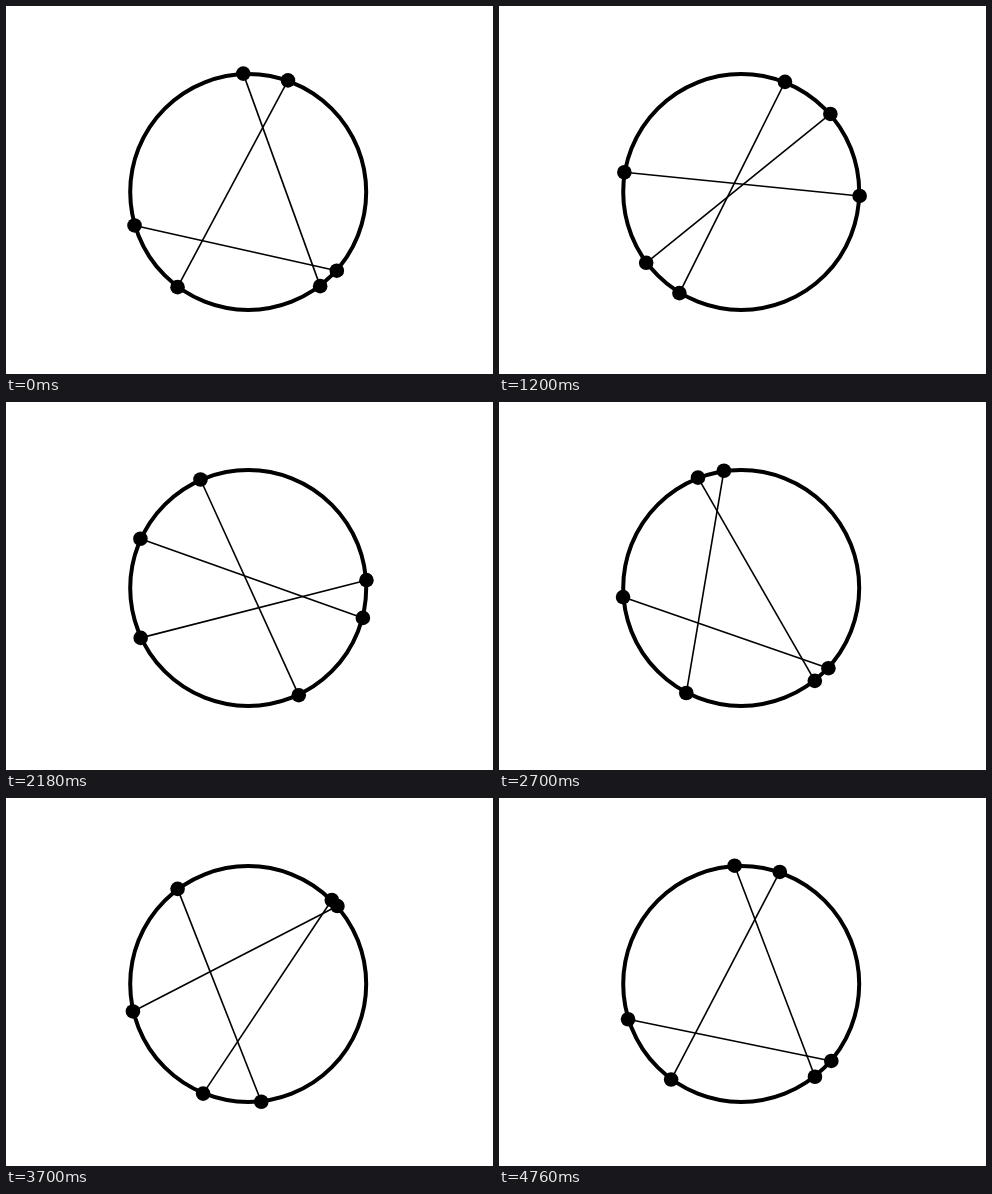
Write an HTML page with a canvas that moves like this. It is 487 px wide and 368 px high and loops after 4.78 s.

```html
<!DOCTYPE html>
<html>
<head>
<meta charset="utf-8">
<style>
html, body { margin: 0; height: 100%; overflow: hidden; background: #fff; }
canvas { display: block; }
</style>
</head>
<body>
<canvas id="stage" width="487" height="368"></canvas>
<script>
const ctx = document.getElementById('stage').getContext('2d');
const LOOP = 4780, STEP = 20, CX = 242.2, CY = 186, R = 118, ORBIT = 118.5;

// All six dots follow one path of six loops and five turns, each a loop ahead of the last.
// Key times within a loop, and the degrees turned clockwise from one key to the next.
const keyTimes = [0, 700, 1700, 2700, 3220, 4180];
const turns = [
  28, 48, 68, 46, 29, 37, 105, 45, 89, 19, 44, 21, 21, 84, 30, 28, 61, 62,
  66, 49, 81, 46, 41, 66, 62, 34, 38, 28, 59, 27, 55, 35, 98, 29, 42, 79
];
const START = 92.4, EASE = 0.5, COUNT = turns.length;

const keys = [];
let angle = START;
turns.forEach((turn, i) => {
  const n = i % 6, span = (keyTimes[n + 1] ?? LOOP) - keyTimes[n];
  keys.push({ time: Math.floor(i / 6) * LOOP + keyTimes[n], angle, turn, span, speed: turn / span });
  angle -= turn;
});

// Harmonic mean of the neighbouring speeds, softened so dots slow down at each key.
keys.forEach((key, i) => {
  const u = keys[(i + COUNT - 1) % COUNT].speed, v = key.speed;
  key.pace = EASE * 2 * u * v / (u + v);
});

function dotAt(t) {
  const i = keys.findLastIndex(key => key.time <= t);
  const { time, angle, turn, span, pace } = keys[i];
  const x = (t - time) / span, y = 1 - x;
  const turned = x * x * (3 - 2 * x) * turn
    + span * x * y * (y * pace - x * keys[(i + 1) % COUNT].pace);
  const a = (angle - turned) * Math.PI / 180;
  return [CX + ORBIT * Math.cos(a), CY - ORBIT * Math.sin(a)];
}

function disc(x, y, r) {
  ctx.beginPath();
  ctx.arc(x, y, r, 0, 2 * Math.PI);
}

function draw(now) {
  const t = Math.floor(now % LOOP / STEP) * STEP;
  const dots = Array.from({ length: 6 }, (_, k) => dotAt(k * LOOP + t));
  ctx.fillStyle = '#fff';
  ctx.fillRect(0, 0, 487, 368);
  ctx.fillStyle = ctx.strokeStyle = '#000';
  ctx.lineWidth = 4;
  disc(CX, CY, R);
  ctx.stroke();
  ctx.lineWidth = 1.6;
  for (let k = 0; k < 3; k++) {
    ctx.beginPath();
    ctx.moveTo(...dots[k]);
    ctx.lineTo(...dots[k + 3]);
    ctx.stroke();
  }
  for (const [x, y] of dots) {
    disc(x, y, 7.3);
    ctx.fill();
  }
}

let start;
function frame(now) {
  start ??= now;
  draw(now - start);
  requestAnimationFrame(frame);
}
draw(0);
requestAnimationFrame(frame);
</script>
</body>
</html>
```
